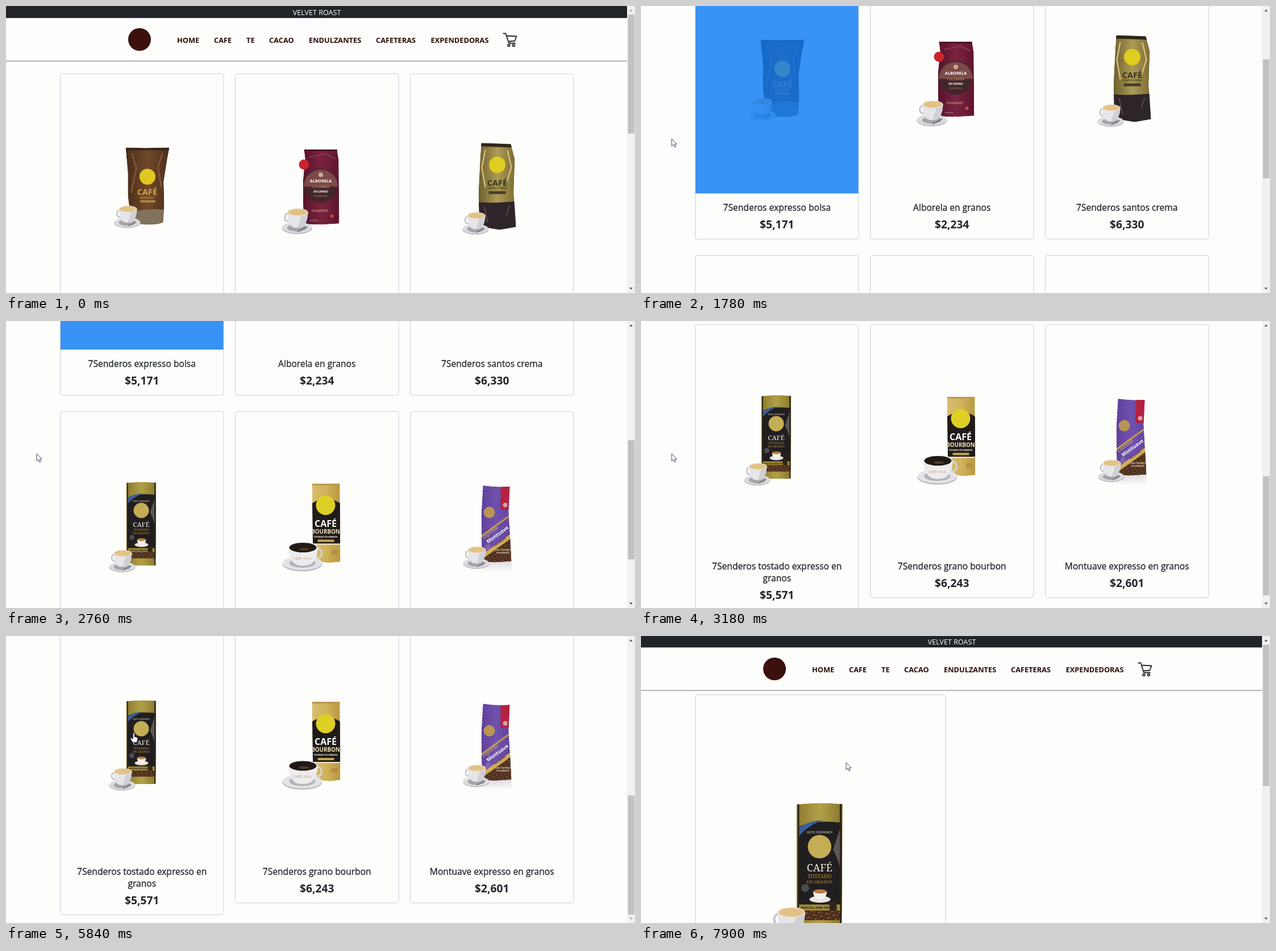
An HTML page for the animation above (8000 ms loop, 1107 px wide and 506 px high).

```html
<!DOCTYPE html>
<html lang="es">
<head>
<meta charset="utf-8">
<title>Velvet Roast</title>
<style>
  html, body { margin: 0; width: 100%; height: 100%; overflow: hidden; background: #fdfdfc; }
  svg { display: block; width: 100%; height: 100%; font-family: "Open Sans", "Noto Sans", sans-serif; }
  .mid { text-anchor: middle; }
  .nav { font-size: 12.8px; font-weight: 700; fill: #2a0d08; }
  .name { font-size: 15.6px; fill: #212529; stroke: #212529; stroke-width: .3; }
  .price { font-size: 19.2px; font-weight: 700; fill: #212529; }
  .frame { fill: none; stroke: #cdcddb; }
  .serif { font-family: "Noto Serif", serif; }
  .tall { font-weight: 700; font-stretch: condensed; }
</style>
</head>
<body>
<svg id="stage" viewBox="0 0 1107 506"></svg>
<script>
const LOOP = 8000;
const ROW_TOPS = [119.5, 629.5];
const COLUMNS = [95.5, 403.5, 711.5];
const CARD_W = 287.5;
const IMAGE_H = 401;

const circle = (x, y, r, fill) => `<circle cx="${x}" cy="${y}" r="${r}" fill="${fill}"/>`;
const oval = (x, y, rx, ry, fill) => `<ellipse cx="${x}" cy="${y}" rx="${rx}" ry="${ry}" fill="${fill}"/>`;
const rect = (x, y, w, h, fill) => `<rect x="${x}" y="${y}" width="${w}" height="${h}" fill="${fill}"/>`;
const shape = (d, fill, extra = "") => `<path d="${d}" fill="${fill}" ${extra}/>`;
const line = (d, color, width) => shape(d, "none", `stroke="${color}" stroke-width="${width}"`);
const label = (x, y, size, fill, text, extra = 'font-weight="700"') =>
  `<text x="${x}" y="${y}" text-anchor="middle" font-size="${size}" fill="${fill}" ${extra}>${text}</text>`;
const serif = (x, y, size, fill, text) => label(x, y, size, fill, text, 'class="serif"');
const tall = (x, y, size, fill, text) => label(x, y, size, fill, text, 'class="tall"');

// Bag silhouette with its printed panels clipped to it
const bag = (id, outline, fill, print) => `
  <clipPath id="${id}"><path d="${outline}"/></clipPath>
  <g clip-path="url(#${id})">${shape(outline, fill)}${print}</g>`;

const cup = (x, y, s = 1) => `<g transform="translate(${x} ${y}) scale(${s})">
  ${oval(23, 31.5, 23, 9, "#b5b5bb")}${oval(23, 30.5, 22.5, 8.5, "#dcdce0")}
  ${oval(23, 31, 15, 5.5, "#a4a4ab")}
  <ellipse cx="9" cy="15" rx="4.5" ry="6" fill="none" stroke="#c2c2c8" stroke-width="2.4"/>
  ${shape("M8 7 Q9 26 17 30 Q24 32 31 30 Q39 25 40 7Z", "#e6e6e9")}
  ${shape("M30 11 L40 7 Q39 25 31 30 Q27 31 24 31Z", "#cfcfd5")}
  ${oval(24, 7, 16, 6, "#ebe3d6")}${oval(24, 7, 14.4, 5, "#e2c284")}
  ${line("M24 37 L39 29", "#65656d", 1.4)}</g>`;

const bags = [
  bag("sack", "M115 130 L150 131 L192 130 L188 152 L182 190 L183 230 L181 262 Q165 268 142 265 L124 255 L119 215 L119 175Z",
    "url(#brown)",
    shape("M115 130H192V135H115Z", "#3b2818") +
    line("M126 140 L134 165 L125 210 M180 140 L172 165 L178 200", "#86613b", 2) +
    shape("M119 246 Q150 236 184 240 V270 H119Z", "#83725c") +
    circle(153.5, 181.5, 14, "#e0c822") +
    tall(153, 213, 14.5, "#d0a545", "CAFÉ") +
    label(153, 220, 5, "#b98e42", "EXPRESSO") + rect(141, 223, 26, 4, "#b08a40")) + cup(95, 231.5),

  bag("wine", "M121 133.5 H179 L182 152 L183 264 L150 266 L120 265 L119 190 L123 150Z",
    "url(#wine-fill)",
    rect(119, 133, 64, 3, "#4a1024") + line("M130 147 L160 141 L176 150", "#92405c", 1.5) +
    circle(150.5, 197, 30, "#41272a") + shape("M120.5 199 a30 30 0 0 1 60 0Z", "#7c4a48") +
    circle(150.5, 178, 4, "#c9a9a0") +
    label(150.5, 191, 7.4, "#fff", "ALBORELA") +
    label(150.5, 201.5, 6, "#d8a878", "COLOMBIA", "") +
    label(150.5, 209.5, 4.8, "#fff", "EN GRANO") +
    rect(139, 214, 23, 3, "#6d4437") +
    serif(149, 243, 7, "#d9b389", "Gourmet") +
    rect(131, 258, 15, 1, "#b6858f") + circle(170, 251, 3, "#c54a4e")) +
    circle(121, 160, 9, "#c6252d") + cup(82, 236, 1.15),

  bag("foil", "M125 122 L177 124 L184 150 L182 210 L186 270 L157 275 L122 269 L120 210 L123 150Z",
    "url(#foil-fill)",
    shape("M120 120H180V130L125 128Z", "#2d2718") +
    line("M132 134 L126 165 L132 200 M171 135 L178 165 L170 190", "#cfbf7d", 2.5) +
    shape("M118 226 Q150 229 190 224 V280 H118Z", "#2d2529") +
    line("M130 233 L136 262 M175 232 L169 250", "#554a50", 2) +
    circle(153, 160.5, 14.5, "#dfcd20") +
    tall(153, 197, 14.5, "#373023", "CAFÉ") +
    label(153, 203, 4.4, "#4b4026", "SANTOS CREMA") + rect(138, 207, 30, 5, "#463c28")) + cup(92, 243),

  bag("slim", "M116 126 Q140 123 169 125.5 L168 272 H116Z",
    "url(#gold)",
    shape("M118.5 152 Q134 143 168 147 V256 H118.5Z", "#211e1f") +
    shape("M118.5 153 Q129 145 147 144 Q129 150 118.5 163Z", "#3a5f98") +
    shape("M168 147 L158 178 Q166 192 168 212Z", "#5b5854") +
    rect(117.4, 125, 1.8, 146, "#2b2416") + rect(165.7, 125, 2.2, 146, "#2b2416") +
    serif(142.5, 159, 3.6, "#e6dfca", "SIETE SENDEROS") +
    circle(142.5, 174.5, 13.5, "#c5ad55") +
    serif(142.5, 203, 11.6, "#f4f1ea", "CAFÉ") +
    serif(142.5, 210.5, 6, "#b8913e", "TOSTADO") + serif(142.5, 216.5, 5.2, "#b8913e", "EN GRANOS") +
    circle(126, 222, 4.5, "#4a4c51") +
    oval(143, 235, 12, 4, "#e7e4df") + shape("M135 226H151Q150 235 143 236Q136 235 135 226Z", "#f4f2ed") +
    oval(143, 226, 7.5, 2.4, "#ba8044") +
    rect(119, 241, 47, 7, "#a38c35") + label(142, 246, 3.5, "#2b2416", "ESPECIAL PARA EXPRESO") +
    rect(119, 248, 47, 11, "url(#beans)") + rect(154, 238, 8, 10, "#302719")) + cup(86, 243),

  bag("pack", "M135 127 H184 L185 265 L165 267 L137 264Z",
    "url(#straw)",
    rect(135, 127, 50, 3, "#b6964a") +
    shape("M135 162 Q159 146 185 162 V233 H135Z", "#201b18") +
    circle(159, 165.5, 17, "#decf25") +
    tall(159, 203, 16, "#fff", "CAFÉ") + tall(159, 215, 9.8, "#eee1bd", "BOURBON") +
    label(159, 222, 3.9, "#fff", "TOSTADO EN GRANOS") +
    rect(145, 226, 29, 4, "#c6a848") + rect(135, 233, 50, 2, "#f0e9d2") +
    rect(169, 244, 11, 8, "#af9043")) +
    oval(118, 269, 35, 13, "#bdbdc3") + oval(118, 267, 34.5, 12.5, "#e4e4e8") + oval(118, 267, 23, 8.5, "#b3b3ba") +
    `<ellipse cx="146" cy="250" rx="6" ry="8" fill="none" stroke="#d6d6db" stroke-width="3"/>` +
    shape("M93 240 Q95 264 107 270 Q119 274 131 270 Q144 264 145 240Z", "#ececee") +
    oval(119, 240, 26, 10, "#f4f4f4") + oval(119, 240, 24, 8.6, "#211914") + oval(121, 243, 9, 2.5, "#4b3829") +
    label(118, 261, 8, "#df9272", "café rico", ""),

  rect(126, 263, 52, 20, "url(#reflection)") +
  bag("violet", "M128 130.5 Q151 134 175 132.5 L173 175 L178 264 L147 266 L126 264 L125 183Z",
    "url(#violet-fill)",
    rect(124, 130, 55, 138, "url(#stripes)") +
    rect(159, 130, 17, 43, "#b42240") + circle(167, 165, 4, "#d9a0a8") +
    circle(139, 178, 10, "#b99555") +
    shape("M179 212 V268 H126 V256Z", "url(#beans)") +
    line("M122 222 L180 180", "#c39d48", 3) + line("M124 258 L182 216", "#d1ac57", 7) +
    `<g transform="rotate(-36 151 219)">
      ${serif(146, 211, 8, "#d9bd72", "Espresso")}${label(154, 222, 9, "#fff", "Montuave")}
      ${label(151, 233.5, 4.5, "#4b2b65", "EN GRANO")}</g>` +
    label(163, 245, 3.8, "#e9d8bd", "CAFÉ TOSTADO") + label(163, 250, 3.8, "#e9d8bd", "EN GRANOS") +
    circle(137, 239, 5, "#8067a8")) + cup(93, 237)
];

const gradient = (id, ...colors) => `<linearGradient id="${id}">` +
  colors.map((c, i) => `<stop offset="${i / (colors.length - 1)}" stop-color="${c}"/>`).join("") +
  `</linearGradient>`;
const pattern = (id, w, h, turn, body) => `<pattern id="${id}" width="${w}" height="${h}"
  patternUnits="userSpaceOnUse" patternTransform="rotate(${turn})">${body}</pattern>`;

const products = [
  [["7Senderos expresso bolsa"], "$5,171"],
  [["Alborela en granos"], "$2,234"],
  [["7Senderos santos crema"], "$6,330"],
  [["7Senderos tostado expresso en", "granos"], "$5,571"],
  [["7Senderos grano bourbon"], "$6,243"],
  [["Montuave expresso en granos"], "$2,601"]
];

const card = ([lines, price], i) => {
  const extra = (lines.length - 1) * 21;
  const mid = CARD_W / 2;
  return `<g transform="translate(${COLUMNS[i % 3]} ${ROW_TOPS[Math.floor(i / 3)]})">
    <use href="#item${i}"/>
    ${i ? "" : `<rect id="selection" width="${CARD_W}" height="${IMAGE_H}" fill="#0978f4" opacity=".8"/>`}
    <rect class="frame" width="${CARD_W}" height="${481.5 + extra}" rx="4"/>
    ${lines.map((s, n) => `<text class="mid name" x="${mid}" y="${431.5 + n * 21}">${s}</text>`).join("")}
    <text class="mid price" x="${mid}" y="${462.5 + extra}">${price}</text></g>`;
};

const links = [[301, "HOME"], [366, "CAFE"], [423, "TE"], [463, "CACAO"],
  [533, "ENDULZANTES"], [651, "CAFETERAS"], [747.5, "EXPENDEDORAS"]];

const header = `<g id="header">
  ${rect(-10, -2, 1130, 23.2, "#212529")}
  ${label(547, 15.6, 12.6, "#fff", "VELVET ROAST", "")}
  ${circle(235, 59, 20, "#3a110d")}
  ${links.map(([x, s]) => `<text class="nav" x="${x}" y="64.6">${s}</text>`).join("")}
  <g fill="none" stroke="#252525" stroke-width="1.8" stroke-linejoin="round" stroke-linecap="round">
    <path d="M875.5 48.5 H879.5 L885 65.5 H896 M881 52.5 L898.5 53.5 L895.5 61.5 L884 62.5"/>
    <circle cx="885" cy="69.5" r="1.9"/><circle cx="893.5" cy="69.5" r="1.9"/></g>
  ${rect(-10, 96.3, 1130, 1.5, "#9d9dac")}</g>`;

const stage = document.getElementById("stage");
stage.innerHTML = `<defs>
  ${gradient("brown", "#4a2d1a", "#71492a", "#4b2f1c")}
  ${gradient("wine-fill", "#571229", "#7b2340", "#5d152d")}
  ${gradient("foil-fill", "#6e5f2c", "#ad9b56", "#7a6a32")}
  ${gradient("gold", "#8a7a2c", "#b3a049", "#87772b")}
  ${gradient("straw", "#d8bd6e", "#d0b25c", "#b8973f")}
  ${gradient("violet-fill", "#533291", "#694aa9", "#56359a")}
  <linearGradient id="reflection" x2="0" y2="1"><stop stop-color="#c9bfc4" stop-opacity=".6"/>
    <stop offset="1" stop-color="#c9bfc4" stop-opacity="0"/></linearGradient>
  ${pattern("beans", 7, 5, -25, rect(0, 0, 7, 5, "#41291b") + oval(2.2, 1.6, 2, 1.3, "#7c5032") + oval(5.4, 3.7, 1.6, 1.1, "#694026"))}
  ${pattern("stripes", 4, 4, 50, rect(0, 0, 1.2, 4, "#7d63b4"))}
  ${bags.map((b, i) => `<g id="item${i}">${b}</g>`).join("")}</defs>
  ${rect(0, 0, 1107, 506, "#fdfdfc")}
  <g id="list">${products.map(card).join("")}</g>
  <g id="detail"><g transform="translate(95.5 104.5)">
    <rect class="frame" width="441" height="740" rx="5"/>
    <use href="#item3" transform="scale(1.535)"/></g></g>
  ${header}
  <path id="spinner" d="M8.5 -8.5 A12 12 0 1 0 8.5 8.5" fill="none" stroke="#1a73f0" stroke-width="3.2"/>
  <g id="scrollbar">${rect(1093, 0, 14, 506, "#f1f1f1")}
    <rect id="thumb" x="1094.5" width="11.5" fill="#c1c1c1"/>
    <path id="up" d="M1097 9.5 L1100 6 L1103 9.5Z"/><path id="down" d="M1097 496.5 L1100 500 L1103 496.5Z"/></g>
  <g id="pointer" fill="#fff" stroke="#34345c" stroke-width=".9" stroke-linejoin="round">
    <path id="arrow" d="M0 0 V13 L3 10.3 L5 15 L7.2 14 L5.2 9.5 H9Z"/>
    <path id="hand" d="M-1.5 1 Q0 -1 1.3 1 V7 L5.5 8 Q7 8.5 6.8 11 L5.3 17 H-1.8 L-5.6 11 Q-5.8 8.6 -3.7 9.3 L-1.5 11Z"/></g>`;

const el = Object.fromEntries([...stage.querySelectorAll("[id]")].map(n => [n.id, n]));
const show = (node, on) => node.setAttribute("visibility", on ? "visible" : "hidden");
const move = (node, x, y, more = "") => node.setAttribute("transform", `translate(${x} ${y}) ${more}`);

const held = (keys, t) => keys.reduce((last, key) => t >= key[0] ? key : last);

const scrollKeys = [[0, 0], [1360, 1], [1620, 70], [1760, 190], [1900, 310], [2040, 395], [2180, 437.5],
  [2580, 441], [2690, 470], [2800, 515], [2900, 560], [3000, 592], [3090, 612], [3180, 623],
  [3320, 636], [3440, 640.5], [6360, 0], [7900, 1]];

// Pointer legs: start, end, steps, from, to
const legs = [
  [500, 900, 3, [20, 215], [54, 234]],
  [4140, 4860, 7, [54, 234], [211, 150]],
  [4980, 5120, 2, [211, 150], [214, 155]],
  [5240, 6120, 8, [214, 155], [230, 178]],
  [7080, 7900, 6, [230, 178], [361, 223]]
];

function pointerAt(t) {
  const [start, end, steps, from, to] = held(legs, t);
  const n = Math.min(steps - 1, Math.max(0, Math.floor((t - start) / (end - start) * (steps - 1) + 1e-6)));
  const p = (n + 1) / steps;
  const ease = p * p * (3 - 2 * p);
  return from.map((v, i) => v + (to[i] - v) * ease);
}

function draw(t) {
  const loading = t >= 6360 && t < 6780;
  const detail = t >= 6780;
  const list = t < 6360;
  const scroll = held(scrollKeys, t)[1];

  show(el.list, list);
  show(el.selection, list && t >= 500);
  show(el.detail, detail);
  show(el.spinner, loading);
  show(el.scrollbar, !loading);
  move(el.list, 0, -scroll);
  move(el.detail, 0, -scroll);
  move(el.header, loading ? 7 : 0, -scroll);

  const tick = 6360 + Math.floor((t - 6360) / 100) * 100;
  move(el.spinner, 566.5, 267, `rotate(${112 + (tick - 6660) * 360 / 750})`);

  const length = detail ? 249 : 210;
  const limit = detail ? 461 : 640.5;
  el.thumb.setAttribute("height", length);
  el.thumb.setAttribute("y", 15 + scroll / limit * (476 - length));
  el.up.setAttribute("fill", scroll > 0 ? "#505050" : "#a3a3a3");
  el.down.setAttribute("fill", scroll < limit ? "#505050" : "#a3a3a3");

  const [x, y] = pointerAt(t);
  const over = list && x > COLUMNS[0];
  const seen = t >= 500;
  show(el.arrow, seen && !over);
  show(el.hand, seen && over);
  move(el.pointer, x, y);
}

const begin = performance.now();
function loop() {
  draw((performance.now() - begin) % LOOP);
  requestAnimationFrame(loop);
}
loop();
</script>
</body>
</html>
```
